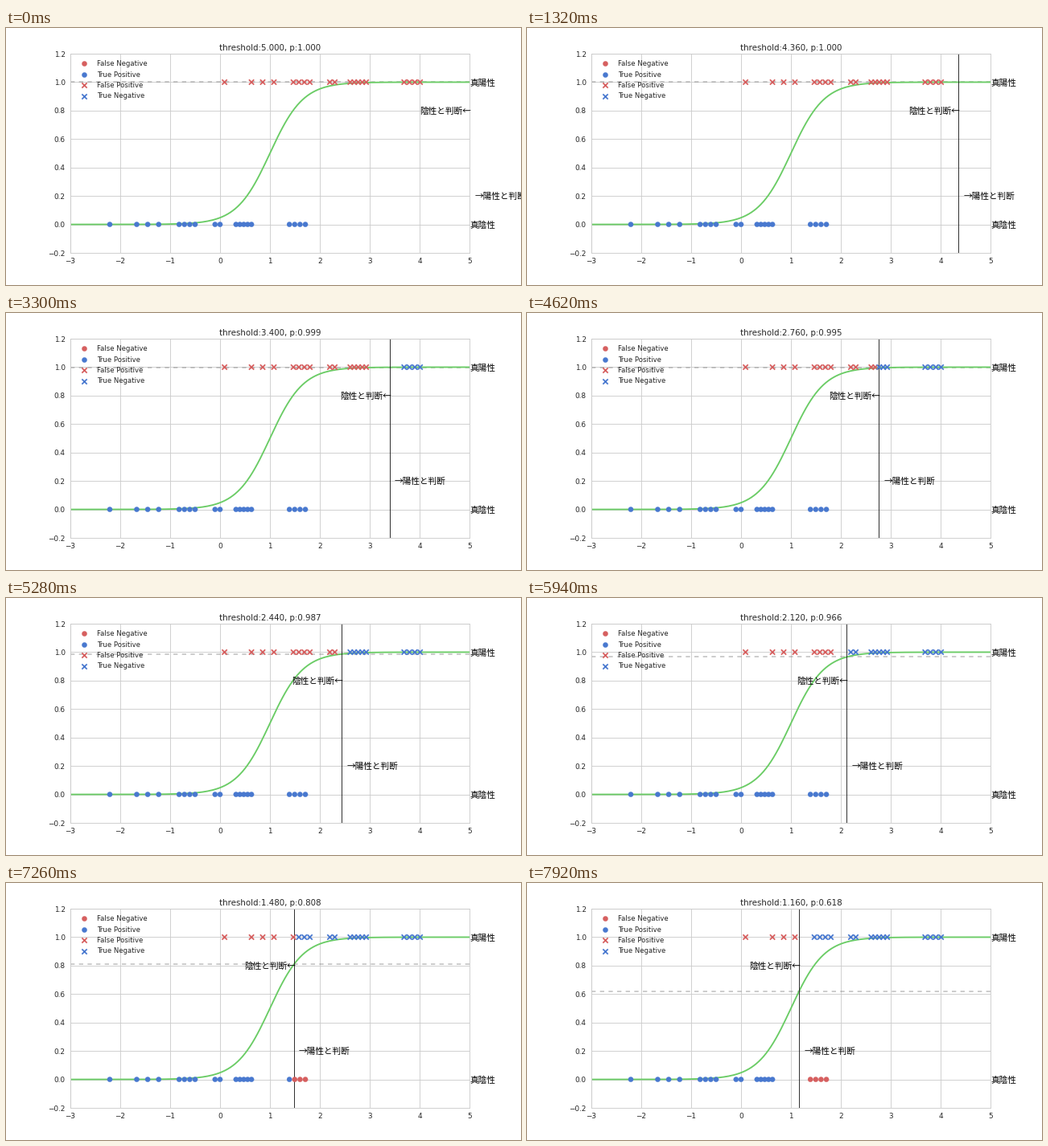
Recreate the animation shown at these times as a matplotlib script. Size 640 by 320 pixels, loop 8 s.

```python
import numpy as np
import matplotlib.pyplot as plt
from matplotlib.animation import FuncAnimation

STEP_MS, FRAME_MS, LOOP_MS = 330, 20, 8000
INK, LINE, GRID = "#262626", "#1a1a1a", "#cccccc"
BLUE, GREEN, RED = "#4878cf", "#6acc65", "#d65f5f"
JP = "Noto Sans CJK JP"

plt.rcParams.update({
    "font.family": "DejaVu Sans",
    "text.color": INK,
    "lines.scale_dashes": False,
    "toolbar": "None",
})

# samples of both classes as a few evenly spread clusters
negatives = np.r_[-2.21, -1.67:-1.23:3j, -0.82:-0.5:4j, -0.1, 0,
                  0.32:0.63:5j, 1.39:1.71:4j]
positives = np.r_[0.09, 0.63:1.08:3j, 1.47:1.8:4j, 2.2, 2.3,
                  2.61:2.93:5j, 3.69:4.01:4j]


def sigmoid(x):
    return 1 / (1 + np.exp(-3 * (x - 1)))


def to_data(px, py):
    """Stage pixels (y down) to data coordinates."""
    return (px - 80) / 62 - 3, 1.2 - (py - 32) * 1.4 / 248


fig = plt.figure(figsize=(10, 5), dpi=64, facecolor="white")
ax = fig.add_axes([0.125, 0.125, 0.775, 0.775])
ax.set(xlim=(-3, 5), ylim=(-0.2, 1.2))
ax.set_xticks(range(-3, 6))
ax.set_yticks(np.round(np.arange(-0.2, 1.3, 0.2), 1))
ax.tick_params(length=0, pad=7, labelsize=10, labelcolor=INK)
ax.set_axisbelow(True)
ax.grid(True, color=GRID, lw=1, ls="-")
for spine in ax.spines.values():
    spine.set(color=GRID, linewidth=1)


def marks(x, y, shape, colors):
    lw = 2 if shape == "x" else 0.3
    return ax.scatter(x, y, s=50, marker=shape, c=colors, linewidths=lw, zorder=3)


def label(x, y, text):
    # lowered so that the characters are centred on y
    return ax.text(x, y - 0.024, text, family=JP, fontsize=12, color="black")


p_line = ax.axhline(1, color="gray", alpha=0.5, lw=1.75, ls=(0, (6, 6)))
xs = np.linspace(-3, 5, 161)
ax.plot(xs, sigmoid(xs), color=GREEN, lw=2.1)
t_line = ax.axvline(5, color=LINE, lw=1)

dots = marks(negatives, np.zeros(len(negatives)), "o", [BLUE] * len(negatives))
crosses = marks(positives, np.ones(len(positives)), "x", [RED] * len(positives))

legend = [("False Negative", "o", RED), ("True Positive", "o", BLUE),
          ("False Positive", "x", RED), ("True Negative", "x", BLUE)]
for i, (name, shape, color) in enumerate(legend):
    row = 44.3 + 13.4 * i
    x, y = to_data(97, row)
    marks([x], [y], shape, [color])
    ax.text(*to_data(112.8, row + 2.9), name, fontsize=9.5)

label(5, 1, "真陽性")
label(5, 0, "真陰性")
left = label(4, 0.8, "陰性と判断←")
right = label(5.1, 0.2, "→陽性と判断")
title = ax.set_title("", fontsize=11.6, pad=5)


def paint(points, is_blue):
    points.set_color([BLUE if b else RED for b in is_blue])


def update(k):
    step = int((k + 0.5) * FRAME_MS // STEP_MS)
    th = 5 - 0.16 * step
    p = sigmoid(th)
    title.set_text(f"threshold:{th:.3f}, p:{p:.3f}")
    t_line.set_xdata([th, th])
    p_line.set_ydata([p, p])
    left.set_x(th - 1)
    right.set_x(th + 0.1)
    paint(dots, negatives < th)
    paint(crosses, positives > th)
    return title, t_line, p_line, left, right, dots, crosses


anim = FuncAnimation(fig, update, frames=LOOP_MS // FRAME_MS,
                     interval=FRAME_MS, repeat=True, repeat_delay=0)
plt.show()
```
